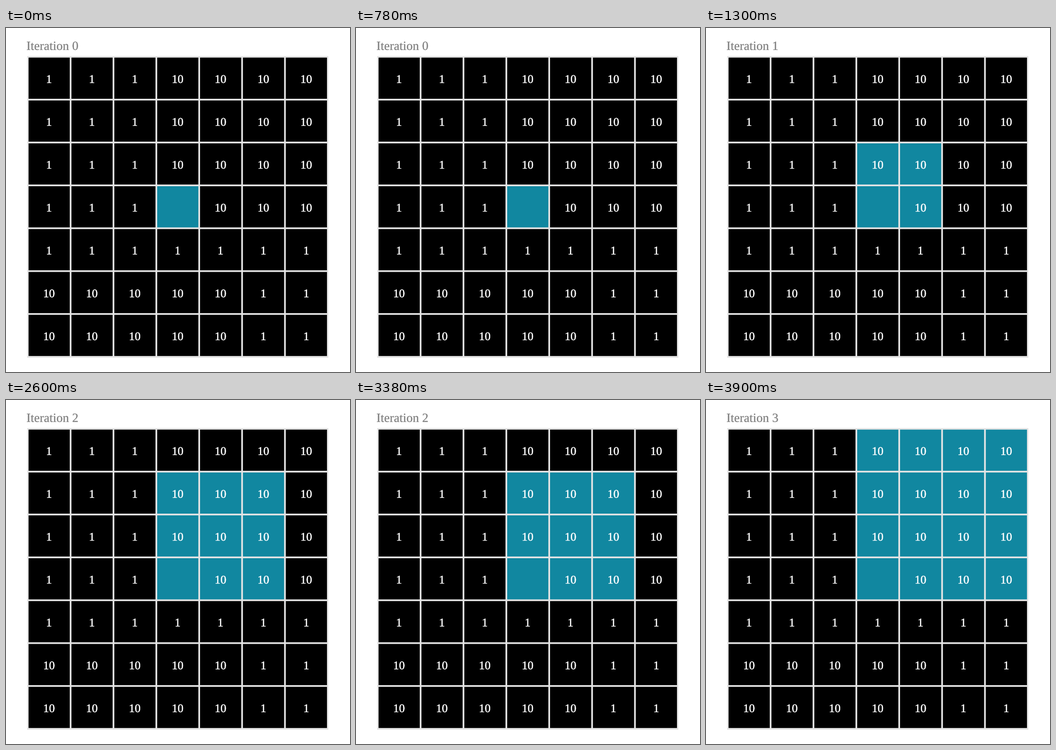
Animation, 748 px wide and 748 px high, one loop 5.2 s. Source, as a matplotlib script:

```python
import matplotlib.pyplot as plt
from matplotlib.animation import FuncAnimation
from matplotlib.patches import PathPatch, Rectangle
from matplotlib.textpath import TextPath
from matplotlib.transforms import Affine2D

SIZE, DPI = 748, 100
COUNT, PITCH, SIDE = 7, 93.22, 89.5
LEFT, TOP = 49.1, 64.4
SEED_ROW = SEED_COL = 3
TEAL, BLACK, GREY, GRID = "#1187a0", "#000000", "#7f7f7f", "#e5e5e5"
TITLE_SIZE, DIGIT_SIZE = 27.3, 25.4

fig = plt.figure(figsize=(SIZE / DPI, SIZE / DPI), dpi=DPI, facecolor="white")
ax = fig.add_axes([0, 0, 1, 1])
ax.set(xlim=(0, SIZE), ylim=(SIZE, 0))
ax.axis("off")


def text_path(text, size):
    return TextPath((0, 0), text, size=size, prop={"family": "Liberation Serif"})


def add_text(x, baseline, text, size, color, weight):
    place = Affine2D().scale(1, -1).translate(x, baseline) + ax.transData
    return ax.add_patch(PathPatch(text_path(text, size), fc=color, ec=color,
                                  lw=weight, snap=False, transform=place))


def add_rect(x, y, width, height, color):
    return ax.add_patch(Rectangle((x, y), width, height, fc=color, lw=0, snap=False))


def cell_value(row, col):
    if (row, col) == (SEED_ROW, SEED_COL):
        return ""
    upper_right = row <= 3 and col >= 3
    lower_left = row >= 5 and col <= 4
    return "10" if upper_right or lower_left else "1"


def in_region(row, col, step):
    return 0 <= SEED_ROW - row <= step and 0 <= col - SEED_COL <= step


add_rect(46, 61, 655, 656, GRID)
cells = {}
for row in range(COUNT):
    for col in range(COUNT):
        x, y = LEFT + PITCH * col, TOP + PITCH * row
        cells[row, col] = add_rect(x, y, SIDE, SIDE, BLACK)
        value = cell_value(row, col)
        if value:
            # Digits are half an em wide.
            start = x + 44.4 - len(value) * DIGIT_SIZE / 4
            add_text(start, y + 55, value, DIGIT_SIZE, "white", 0.4)

title = add_text(44.5, 47.7, "Iteration 0", TITLE_SIZE, GREY, 0.2)


def update(step):
    title.set_path(text_path(f"Iteration {step}", TITLE_SIZE))
    for (row, col), cell in cells.items():
        cell.set_facecolor(TEAL if in_region(row, col, step) else BLACK)
    return [title, *cells.values()]


anim = FuncAnimation(fig, update, frames=4, interval=1300, repeat=True, repeat_delay=0)
plt.show()
```
